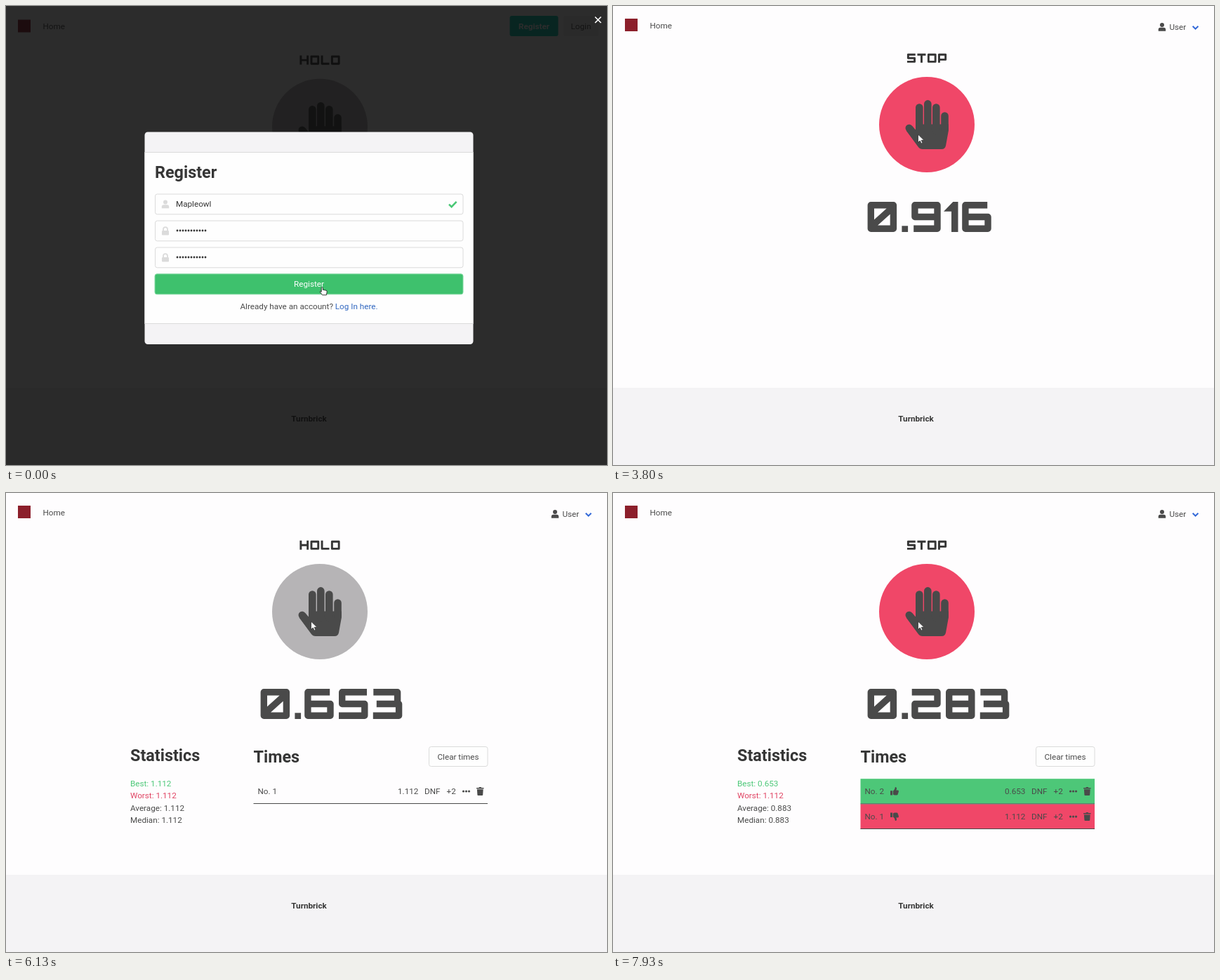
An HTML page for the animation above (8 s loop, 856x654 px).

```html
<!DOCTYPE html>
<html lang="en">
<head>
<meta charset="utf-8">
<title>Cube timer</title>
<style>
html, body { margin: 0; width: 100%; height: 100%; overflow: hidden; background: #fefdfe; }
svg { display: block; width: 856px; height: 654px; }
text { font: 11.7px Roboto, sans-serif; fill: #4a4a4a; }
.mid { text-anchor: middle; }
.bold { font-weight: 700; fill: #363636; }
.head { font-size: 23.4px; font-weight: 700; fill: #363636; }
.box { fill: #fefefe; stroke: #dbdbdb; }
.glyphs { fill: none; stroke-linejoin: round; }
.ink { fill: #4a4a4a; }
.pale { fill: #dbdbdb; }
.line { stroke: #4a4a4a; }
</style>
</head>
<body>
<svg viewBox="0 0 856 654">
  <defs>
    <g id="person"><circle cy="-3" r="3"/><path d="M-5.2 5.8V3.6Q-5.2.8-2.4.8H2.4Q5.2.8 5.2 3.6V5.8Z"/></g>
    <g id="lock"><rect x="-5" y="-.6" width="10" height="6.6" rx="1.2"/><path d="M-3-.5V-2.4a3 3 0 0 1 6 0V-.5" fill="none" stroke="#dbdbdb" stroke-width="1.8"/></g>
    <g id="dots"><circle cx="-4" r="1.6"/><circle r="1.6"/><circle cx="4" r="1.6"/></g>
    <g id="trash"><path d="M-5.2-5H-2L-1.3-6H1.3L2-5H5.2V-3.5H-5.2ZM-4.4-2.7H4.4L3.9 5Q3.8 6 2.9 6H-2.9Q-3.8 6-3.9 5Z"/></g>
    <g id="thumb"><path d="M-6-.8H-2.9V5.6H-6ZM-2.1-.5C-.2-2 .4-3 .7-5.2Q1-6.3 2.1-5.8C3.6-5 3-3 2.3-1.5H4.8Q6.2-1.3 5.9.1Q6 1 5.5 1.6Q5.7 2.5 4.9 3.2Q5 5.6 3 5.6H.6Q-1 5.5-2.1 4.6Z"/></g>
  </defs>

  <rect width="856" height="654" fill="#fefdfe"/>
  <rect y="544" width="856" height="110" fill="#f4f3f5"/>
  <text class="mid bold" x="431.5" y="592.3">Turnbrick</text>

  <g id="brand">
    <rect x="17" y="18" width="18" height="18" fill="#8c1f2b"/>
    <text x="52.5" y="31.6">Home</text>
  </g>
  <g id="guest">
    <rect x="717.5" y="14" width="69" height="29" rx="3" fill="#00d1b2"/>
    <text class="mid" x="752" y="33" style="fill:#fff;font-weight:700">Register</text>
    <rect x="794" y="14" width="50" height="29" rx="3" fill="#f5f5f5"/>
    <text class="mid" x="819" y="33">Login</text>
  </g>
  <g id="member">
    <use href="#person" class="ink" x="782" y="30"/>
    <text x="792.5" y="34.3">User</text>
    <path d="M825.7 28.8L829.6 32.7L833.5 28.8" fill="none" stroke="#3268d8" stroke-width="2"/>
  </g>

  <g id="timer">
    <g id="label" class="glyphs" stroke="#363636" stroke-width="2.9"></g>
    <circle id="disc" cx="447" cy="169" r="68"/>
    <path class="ink" d="M431 168.5H477.8V178L474 199Q473 204 468 204H441Q437 204 434.5 200.5L418 178L426 171L431 176.5Z"/>
    <path d="M436.3 144.5V178M448.3 139.4V178M460.3 144.5V178M472.5 156.5V176M421.8 174L434 190" fill="none" class="line" stroke-width="10.6" stroke-linecap="round"/>
    <g id="count" class="glyphs line" stroke-width="9.4"></g>
  </g>

  <g id="results">
    <text class="head" x="177" y="382">Statistics</text>
    <g id="stats"></g>
    <text class="head" x="352.5" y="383.5">Times</text>
    <rect class="box" x="602.5" y="361.5" width="83.5" height="28" rx="3"/>
    <text class="mid" x="644" y="379.7">Clear times</text>
    <g id="rows"></g>
  </g>

  <g id="modal">
    <rect width="856" height="654" fill="#0a0a0a" fill-opacity=".86"/>
    <path d="M839 15.5L847.5 24M847.5 15.5L839 24" stroke="#fff" stroke-width="1.6"/>
    <rect x="197.5" y="179.5" width="468" height="302.5" rx="4.5" fill="#f4f3f5"/>
    <rect x="197.5" y="208.5" width="468" height="244" fill="#fefefe"/>
    <path d="M197.5 208.5H665.5M197.5 452.5H665.5" stroke="#dbdbdb"/>
    <text class="head" x="212" y="245">Register</text>
    <rect class="box" x="212.5" y="268" width="438.5" height="28.8" rx="3"/>
    <rect class="box" x="212.5" y="306" width="438.5" height="28.8" rx="3"/>
    <rect class="box" x="212.5" y="344" width="438.5" height="28.8" rx="3"/>
    <use href="#person" class="pale" x="227" y="282.5"/>
    <use href="#lock" class="pale" x="227" y="320.5"/>
    <use href="#lock" class="pale" x="227" y="358.5"/>
    <text x="242" y="286.2" style="fill:#363636">Mapleowl</text>
    <path d="M244 320H285M244 358H285" stroke="#363636" stroke-width="2.8" stroke-linecap="round" stroke-dasharray="0 4"/>
    <path d="M631 282.6L634.6 286.2L641.6 278.8" fill="none" stroke="#48c774" stroke-width="2.5"/>
    <rect x="212" y="381.8" width="439" height="29" rx="3" fill="#3ec16d" stroke="#86dba5"/>
    <text class="mid" x="431.5" y="400.2" style="fill:#fff">Register</text>
    <text class="mid" x="431.5" y="432.2">Already have an account? <tspan fill="#3268c0">Log In here.</tspan></text>
    <path transform="translate(447 400)" d="M2.2 1.3Q3.4-.2 4.3 1.3V4.3L8.9 5.2Q10.4 5.6 10.2 7.2L9.4 11.8H3.6L.4 7.8Q-.2 6.5 1 6.3L2.2 7.4Z" fill="#fff" stroke="#222" stroke-width=".9"/>
  </g>
  <path id="arrow" d="M0 0V11.5L2.7 9L4.6 13L6.5 12.2L4.7 8.3H8.5Z" fill="#fff" stroke="#333" stroke-width=".8"/>
</svg>

<script>
const LOOP = 8000, STEP = 200 / 3;
const $ = id => document.getElementById(id);

// Square display lettering: [width, centre line]
const LETTERS = {
  H: [12.6, 'M1.4 0V13M11.2 0V13M1.4 6.5H11.2'],
  O: [12.6, 'M1.4 1.4H11.2V11.6H1.4Z'],
  L: [11.8, 'M1.4 0V11.6H11.8'],
  D: [12.6, 'M1.4 1.4H11.2V11.6H1.4Z'],
  W: [17, 'M1.2 0L4.8 11.6L8.5 1.4L12.2 11.6L15.8 0'],
  A: [12, 'M1.4 13V1.4H10.6V13M1.4 7.6H10.6'],
  I: [2.9, 'M1.4 0V13'],
  T: [12, 'M0 1.4H12M6 0V13'],
  R: [12, 'M1.4 13V1.4H10.6V8.4H1.4M6.4 8.4L10.4 13'],
  E: [11.6, 'M11.6 1.4H1.4V11.6H11.6M1.4 6.5H11'],
  S: [12, 'M11.8 1.4H1.4V6.5H10.6V11.6H0'],
  P: [12, 'M1.4 13V1.4H10.6V8.6H1.4']
};
const DIGITS = {
  0: 'M4.7 4.7H36.8V38.3H4.7ZM8 33L33.5 10',
  2: 'M.5 4.7H36.8V21.5H4.7V38.3H41.5',
  3: 'M.5 4.7H34.8V21.5M5 21.5H36.8V38.3H0',
  4: 'M30 43V4.7L4.7 29.5H41.5',
  5: 'M40 4.7H4.7V21.5H36.8V38.3H0',
  6: 'M36 4.7H4.7V38.3H36.8V21.5H4.7',
  7: 'M0 4.7H36.8V43',
  8: 'M4.7 4.7H36.8V38.3H4.7ZM4.7 21.5H36.8',
  9: 'M36.8 21.5H4.7V4.7H36.8V38.3H3'
};
const ONE = '<path fill="#4a4a4a" stroke="none" d="M-3 13.8L10.3 0H17.5V43H8V13.8Z"/>';
const DOT = '<path fill="#4a4a4a" stroke="none" d="M0 34.3H8.7V43H0Z"/>';

const PHASES = {
  HOLD: '#b6b4b6', WAIT: '#ffdc58', RELEASE: '#4dc778', STOP: '#f04768'
};
const SCHEDULE = [
  [0, 'HOLD'], [1600, 'WAIT'], [2150, 'RELEASE'], [2884, 'STOP'],
  [3996, 'HOLD'], [4600, 'WAIT'], [5150, 'RELEASE'], [5430, 'STOP'],
  [6083, 'HOLD'], [6800, 'WAIT'], [7350, 'RELEASE'], [7650, 'STOP']
];
// [start, duration] of each solve in ms
const SOLVES = [[2884, 1112], [5430, 653], [7650, 900]];
const LISTED = [4700, 6800];
const DIVIDED = 7330;

const at = (x, y, body) => `<g transform="translate(${x} ${y})">${body}</g>`;
const show = (id, on) => $(id).style.display = on ? '' : 'none';

function put(id, html) {
  const el = $(id);
  if (el.last !== html) el.innerHTML = el.last = html;
}

function labelArt(word) {
  const gap = 2.5;
  const total = [...word].reduce((sum, c) => sum + LETTERS[c][0] + gap, -gap);
  let x = 447 - total / 2;
  return [...word].map(c => {
    const [w, d] = LETTERS[c], art = at(x, 67.8, `<path d="${d}"/>`);
    x += w + gap;
    return art;
  }).join('');
}

function countArt(value) {
  let x = 359;
  return [...value].map(c => {
    const body = c === '1' ? ONE : c === '.' ? DOT : `<path d="${DIGITS[c]}"/>`;
    const art = at(x + 3.6, 279, body);
    x += c === '1' ? 23.2 : c === '.' ? 13.8 : 48.8;
    return art;
  }).join('');
}

function countAt(t) {
  const solve = SOLVES.filter(([start]) => t >= start).pop();
  if (!solve) return '0.00';
  return (Math.min(t - solve[0], solve[1]) / 1000).toFixed(3);
}

function statsArt(times) {
  const mean = times.reduce((a, b) => a + b) / times.length;
  const fix = ms => (Math.round(ms) / 1000).toFixed(3);
  return [
    ['Best', Math.min(...times), '#4cc878'], ['Worst', Math.max(...times), '#e04463'],
    ['Average', mean, '#4a4a4a'], ['Median', mean, '#4a4a4a']
  ].map(([name, ms, color], i) =>
    `<text x="177" y="${417.6 + i * 17.55}" style="fill:${color}">${name}: ${fix(ms)}</text>`).join('');
}

function rowArt(no, ms, y, fill, flip) {
  const back = fill ? `<rect x="352.5" width="333.5" height="35.5" fill="${fill}"/>` : '';
  const thumb = fill ? `<use href="#thumb" class="ink" transform="translate(401 17.8) scale(1 ${flip})"/>` : '';
  const cells = [[358.5, 'No. ' + no], [558, (ms / 1000).toFixed(3)], [596, 'DNF'], [627.5, '+2']];
  return at(0, y, back + thumb +
    cells.map(([x, s]) => `<text x="${x}" y="22.2">${s}</text>`).join('') +
    '<use href="#dots" class="ink" x="655.5" y="17.8"/><use href="#trash" class="ink" x="675.3" y="17.8"/>');
}

const rule = y => `<path class="line" d="M352.5 ${y}H686"/>`;

function rowsArt(t) {
  if (t < LISTED[1]) return rowArt(1, 1112, 407.2) + rule(442.5);
  const split = t >= DIVIDED;
  return rowArt(1, 1112, split ? 443.3 : 442.6, PHASES.STOP, -1) +
    rowArt(2, 653, 407.2, PHASES.RELEASE, 1) +
    (split ? rule(442.9) : '') + rule(split ? 478.5 : 477.8);
}

function draw(t) {
  const open = t < 60;
  show('modal', open);
  show('guest', open);
  show('member', !open);
  show('arrow', !open);
  $('brand').setAttribute('transform', `translate(0 ${open ? 1.5 : 0})`);
  $('timer').setAttribute('transform', `translate(0 ${open ? 2.8 : 0})`);

  const p = Math.max(0, Math.min(1, (t - 60) / 800)), ease = p * p * (3 - 2 * p);
  $('arrow').setAttribute('transform', `translate(${450 - 15.5 * ease} ${401 - 218 * ease})`);

  const phase = SCHEDULE.filter(([start]) => t >= start - 3).pop()[1];
  put('label', labelArt(phase));
  $('disc').setAttribute('fill', PHASES[phase]);
  put('count', countArt(countAt(t)));

  const listed = t >= LISTED[0];
  show('results', listed);
  if (listed) {
    put('stats', statsArt(t < LISTED[1] ? [1112] : [1112, 653]));
    put('rows', rowsArt(t));
  }
}

// The picture advances 15 times a second.
function tick() {
  const t = performance.now() % LOOP;
  draw(Math.floor((t + 4) / STEP) % 120 * STEP);
  requestAnimationFrame(tick);
}
tick();
</script>
</body>
</html>
```
